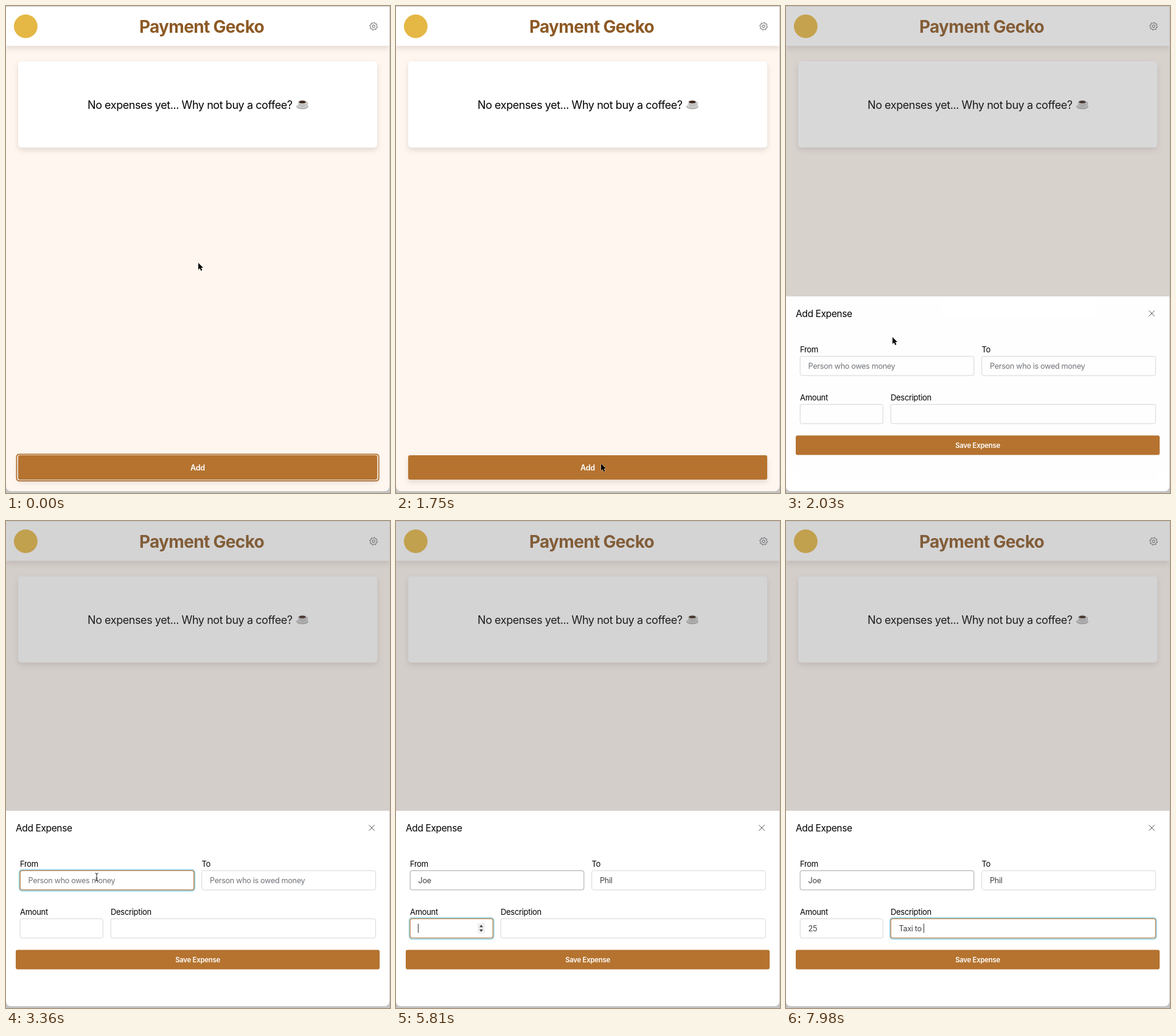
An HTML page for the animation above (8 s loop, 631 px wide and 800 px high).

```html
<!DOCTYPE html>
<html lang="en">
<head>
<meta charset="utf-8">
<title>Expense form</title>
<style>
  html, body { margin: 0; width: 100%; height: 100%; overflow: hidden; background: #c4c4c4; }
  svg { display: block; width: 631px; height: 800px; }
  text { font: 12.6px Inter, sans-serif; letter-spacing: -.024em; white-space: pre; }
  .title { font-size: 28px; font-weight: 700; fill: #8d5a25; text-anchor: middle; }
  .empty { font-size: 18px; }
  .heading { font-size: 15.5px; }
  .label { font-size: 13px; }
  .button { font-weight: 600; fill: #fff; text-anchor: middle; }
  .save { font-size: 11.4px; }
  .hint { fill: #6f7378; }
  .value { fill: #3c3f44; }
  .line { fill: none; stroke: #5a5a5e; }
  .card { fill: #fff; filter: drop-shadow(0 4px 4px rgba(70, 50, 40, .15)); }
</style>
</head>
<body>
<svg viewBox="0 0 631 800">
  <defs>
    <clipPath id="window"><path d="M0 1H630V788Q630 797 621 797H9Q0 797 0 788Z"/></clipPath>
  </defs>
  <rect width="631" height="800" fill="#c4c4c4"/>
  <g clip-path="url(#window)">
    <rect width="631" height="800" fill="#fef6ef"/>
    <rect class="card" y="-9" width="630" height="74.5"/>
    <circle cx="32.4" cy="33.4" r="19.4" fill="#e5b744"/>
    <text class="title" x="321.5" y="44">Payment Gecko</text>
    <g transform="translate(604 33.3)">
      <path id="gear" class="line"/>
      <circle class="line" r="2.2"/>
    </g>

    <rect class="card" x="20" y="91" width="590" height="141.5" rx="5"/>
    <text class="empty" x="134" y="168.5">No expenses yet... Why not buy a coffee?</text>
    <g>
      <ellipse cx="487" cy="165.3" rx="9.8" ry="4.2" fill="#aaa9a8"/>
      <ellipse cx="487" cy="164.3" rx="9" ry="3.4" fill="#d2d1d0"/>
      <circle cx="493.2" cy="160.3" r="2.3" fill="none" stroke="#b5b4b3" stroke-width="1.3"/>
      <path d="M480 157.5Q480 166.5 487 166.5T494 157.5Z" fill="#c3c2c1"/>
      <ellipse cx="487" cy="157.5" rx="7" ry="3" fill="#dcdbda"/>
      <ellipse cx="487" cy="157.7" rx="5.8" ry="2.1" fill="#3c2518"/>
    </g>

    <g id="ring">
      <rect x="16.5" y="735.5" width="597" height="45.5" rx="5" fill="#b5732f"/>
      <rect x="18.3" y="737.2" width="593.4" height="42" rx="4" fill="#fef6ef"/>
    </g>
    <rect class="card" x="20" y="738" width="590" height="40" rx="3" style="fill:#b5732f"/>
    <text class="button" x="315" y="762.5">Add</text>

    <rect id="shade" width="631" height="800" fill="#64646a"/>

    <g id="panel">
      <rect y="476" width="631" height="324" fill="#fff"/>
      <text class="heading" x="16" y="509.8">Add Expense</text>
      <path class="line" d="M596.3 499.3l9.4 9.4m0-9.4l-9.4 9.4"/>
      <g id="fields"></g>
      <g id="spinner">
        <rect x="134" y="660.5" width="12" height="17" rx="2" fill="#efefef"/>
        <path d="M137 667.2L140 663.2L143 667.2ZM137 671L140 675L143 671Z" fill="#444"/>
      </g>
      <rect id="caret" width="1" height="15" fill="#333"/>
      <rect x="16" y="704.5" width="598" height="32" rx="3" fill="#b5732f"/>
      <text class="button save" x="315" y="724.6">Save Expense</text>
    </g>
    <path id="arrow" d="M0 0V11.2L2.6 8.8L4.4 13L6.4 12.1L4.5 8.1H8Z"
          fill="#000" stroke="#fff" stroke-width=".8" paint-order="stroke"/>
    <path id="beam" class="line" style="stroke:#222"
          d="M-2.5-6.5Q0-6.5 0-4.5V4.5Q0 6.5-2.5 6.5M2.5-6.5Q0-6.5 0-4.5M0 4.5Q0 6.5 2.5 6.5M-1.5 1.5H1.5"/>
  </g>
  <path d="M0 .5H630.5V790" fill="none" stroke="#c6c6c6"/>
</svg>

<script>
const LOOP = 8000, STEP = 70, FADE = 200;
const $ = id => document.getElementById(id);
const clamp = v => Math.min(1, Math.max(0, v));
const progress = (t, start, span) => clamp((t - start) / span);

function add(parent, tag, attrs, content = "") {
  const node = document.createElementNS("http://www.w3.org/2000/svg", tag);
  for (const key in attrs) node.setAttribute(key, attrs[key]);
  node.textContent = content;
  return parent.appendChild(node);
}

// keys: the time at which each letter of the value is typed
const fields = [
  { label: "From", x: 23, y: 574, w: 286, hint: "Person who owes money", value: "Joe",
    focus: 3150, blur: 4270, caretFrom: 3640, hover: 2240, keys: [3640, 3780, 3850] },
  { label: "To", x: 321.5, y: 574, w: 286, hint: "Person who is owed money", value: "Phil",
    focus: 4200, blur: 5600, caretFrom: 4270, keys: [4970, 5110, 5250, 5390] },
  { label: "Amount", x: 23, y: 653, w: 136.5, hint: "", value: "25",
    focus: 5590, blur: 6440, caretFrom: 5590, keys: [6230, 6300] },
  { label: "Description", x: 172, y: 653, w: 435.5, hint: "", value: "Taxi to ",
    focus: 6430, blur: 9000, caretFrom: 6440,
    keys: [7280, 7350, 7490, 7560, 7700, 7840, 7910, 7980] }
];

for (const f of fields) {
  const { x, y, w } = f, root = $("fields");
  add(root, "text", { class: "label", x, y: y - 6.3 }, f.label);
  f.glow = add(root, "rect", { x: x - .5, y: y - .5, width: w + 1, height: 33.5, rx: 4,
    fill: "none", stroke: "#a5daee", "stroke-width": 3.6 });
  const box = { x: x + .2, y: y + .4, width: w - .4, height: 31.6, rx: 3 };
  f.box = add(root, "rect", { ...box, fill: "#fff", stroke: "#d5d6d9" });
  f.edge = add(root, "rect", { ...box, fill: "none", stroke: "#b98045", "stroke-width": 1.2 });
  f.text = add(root, "text", { x: x + 13.5, y: y + 21 });
}

function gearPath() {
  let d = "";
  for (let i = 0; i < 32; i++) {
    const angle = (i + .5) * Math.PI / 16;
    const r = i % 4 < 2 ? 6.4 : 4.9;
    d += (i ? "L" : "M") + (r * Math.cos(angle)).toFixed(2) + " " + (r * Math.sin(angle)).toFixed(2);
  }
  return d + "Z";
}
$("gear").setAttribute("d", gearPath());

const path = [
  [910, 316, 422], [1085, 324, 600], [1260, 335, 724], [1470, 340, 756], [1750, 337, 752],
  [1890, 291, 679], [2030, 175, 544], [2240, 150, 574], [2520, 149, 585]
];

function pointer(t) {
  const i = path.findIndex(p => p[0] > t);
  if (i === 0) return path[0].slice(1);
  if (i < 0) return path[path.length - 1].slice(1);
  const [t0, x0, y0] = path[i - 1], [t1, x1, y1] = path[i];
  const k = (t - t0) / (t1 - t0);
  return [x0 + (x1 - x0) * k, y0 + (y1 - y0) * k];
}

function show(node, visible) {
  node.style.display = visible ? "" : "none";
}

function drawField(f, t) {
  const typed = f.keys.filter(k => k <= t);
  const focus = progress(t, f.focus, FADE) * (1 - progress(t, f.blur, FADE));
  f.glow.setAttribute("opacity", focus);
  f.edge.setAttribute("opacity", focus);
  f.box.setAttribute("stroke", t >= f.hover ? "#a5a6a9" : "#d5d6d9");
  f.text.textContent = typed.length ? f.value.slice(0, typed.length) : f.hint;
  f.text.setAttribute("class", typed.length ? "value" : "hint");

  if (t < f.caretFrom || t >= f.blur) return;
  const since = t - (typed.length ? typed[typed.length - 1] : f.caretFrom);
  const length = typed.length ? f.text.getComputedTextLength() : 0;
  $("caret").setAttribute("x", Math.round(f.x + 13.2 + length));
  $("caret").setAttribute("y", f.y + 8.5);
  show($("caret"), since % 1000 < 500);
}

function draw(t) {
  $("ring").setAttribute("opacity", 1 - progress(t, 0, 210));

  const open = progress(t, 1774, 300);
  const slide = 1 - (1 - open) ** 3;
  $("shade").setAttribute("opacity", .28 * open ** .7);
  $("panel").setAttribute("opacity", slide);
  $("panel").setAttribute("transform", `translate(0 ${322 * (1 - slide)})`);

  show($("caret"), false);
  fields.forEach(f => drawField(f, t));
  show($("spinner"), t >= 5600 && t < 6440);

  const place = `translate(${pointer(t).join(" ")})`;
  $("arrow").setAttribute("transform", place);
  $("beam").setAttribute("transform", place);
  show($("arrow"), t < 2240);
  show($("beam"), t >= 2240 && t < 3640);
}

function tick() {
  const t = performance.now() % LOOP;
  draw(Math.floor(t / STEP) * STEP);
  requestAnimationFrame(tick);
}
tick();
</script>
</body>
</html>
```
